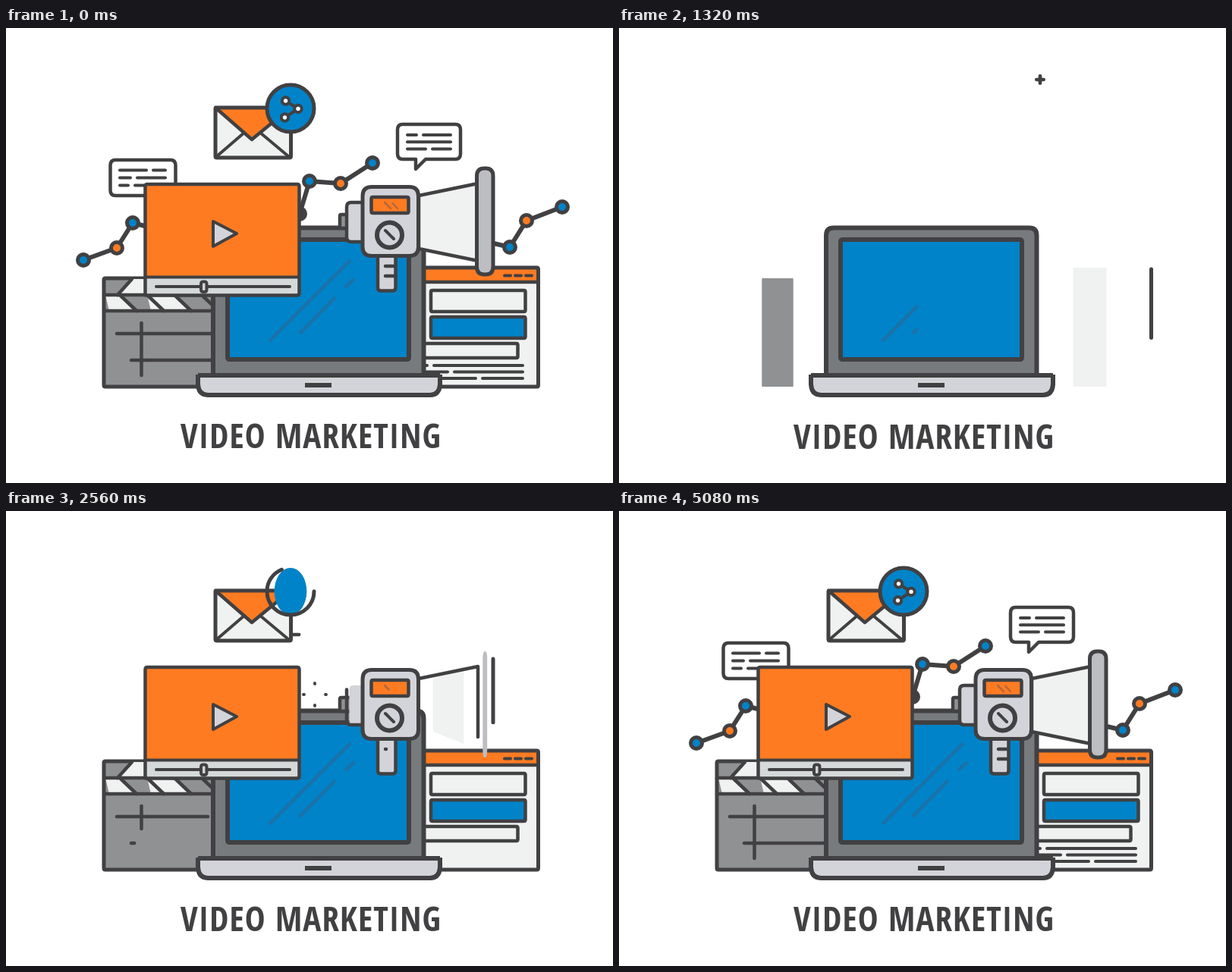
Write an HTML page that moves like this. It is 800 px wide and 600 px high and loops after 5120 ms.

```html
<!DOCTYPE html>
<html lang="en">
<head>
<meta charset="utf-8">
<title>Video Marketing</title>
<style>
  html, body { margin: 0; width: 100%; height: 100%; overflow: hidden; background: #fff; }
  svg { display: block; width: 100vw; height: 100vh; stroke-linecap: round; stroke-linejoin: round; }
  path { fill: none; }
  text { font-family: sans-serif; font-stretch: extra-condensed; fill: #414042; }
</style>
</head>
<body>
<svg viewBox="0 0 800 600">
  <clipPath id="below"><rect y="488" width="800" height="112"/></clipPath>
  <g id="art"></g>
  <g clip-path="url(#below)"><text id="title">VIDEO MARKETING</text></g>
</svg>
<script>
const LOOP = 5120, STEP = 40, DUR = 350;
const DARK = '#414042', ORANGE = '#ff7b22', BLUE = '#0083c8', GRAY = '#787b7e', SLATE = '#8f9193',
      LIGHT = '#d3d4d9', PALE = '#f0f1f1', RIM = '#bcbec2', SHINE = '#1a72a8', RUST = '#b5683c';
const updates = [];
let parent = document.getElementById('art');

// Parts start one after another on a shared clock.
let clock = 0, gap = 0;
function cue(start, stagger = 80) {
  clock = start;
  gap = stagger;
}
function next() {
  clock += gap;
  return clock - gap;
}

function ramp(t, start, dur = DUR) {
  const p = Math.min(1, Math.max(0, (t - start) / dur));
  return p * p * (3 - 2 * p);
}

function node(tag, attrs) {
  const el = document.createElementNS('http://www.w3.org/2000/svg', tag);
  for (const key in attrs) el.setAttribute(key, attrs[key]);
  parent.append(el);
  return el;
}

const show = (el, on) => el.setAttribute('visibility', on ? 'visible' : 'hidden');
const widen = (x, p) => `translate(${x * (1 - p)} 0) scale(${p || 0.001} 1)`;

function group(build, move, attrs) {
  const outer = parent;
  const g = parent = node('g', attrs);
  build();
  parent = outer;
  if (move) updates.push(t => g.setAttribute('transform', move(t)));
}

const slide = (dx, dy, start) => t => {
  const rest = 1 - ramp(t, start);
  return `translate(${dx * rest} ${dy * rest})`;
};

// Widens from its own vertical axis.
function fill(d, color, dur) {
  const start = next(), el = node('path', { d });
  el.style.fill = color;
  const box = el.getBBox(), axis = box.x + box.width / 2;
  updates.push(t => {
    const p = ramp(t, start, dur);
    show(el, p > 0.004);
    el.setAttribute('transform', widen(axis, p));
  });
}

// Trims a path: off and spin place the start, out is when it is wiped again.
function line(d, { w = 4.5, color = DARK, dur, off = 0, spin = 0, out = LOOP } = {}) {
  const start = next(), period = d.endsWith('Z') ? 1 : 2;
  const el = node('path', { d, pathLength: 1, stroke: color, 'stroke-width': w });
  updates.push(t => {
    const p = ramp(t, start, dur), q = ramp(t, out), len = p - q;
    show(el, len > 0.004);
    el.setAttribute('stroke-dasharray', len < 1 ? `${len} ${period - len}` : 'none');
    el.setAttribute('stroke-dashoffset', -(off + spin * p + q));
  });
  return el;
}

function shape(d, color, options = {}) {
  const start = clock;
  fill(d, color, options.dur);
  clock = start;
  return line(d, options);
}

const round = (x, y, w, h, r = 2) =>
  `M${x + w} ${y + r}v${h - 2 * r}q0 ${r} ${-r} ${r}h${2 * r - w}q${-r} 0 ${-r} ${-r}` +
  `v${2 * r - h}q0 ${-r} ${r} ${-r}h${w - 2 * r}q${r} 0 ${r} ${r}Z`;
const circle = (x, y, r) => `M${x + r} ${y}a${r} ${r} 0 1 1 ${-2 * r} 0a${r} ${r} 0 1 1 ${2 * r} 0Z`;

// Lines of copy, each broken by one word space (0 for none).
function copy(left, right, top, pitch, spaces) {
  spaces.forEach((x, i) => {
    const ends = x ? [[right, x + 4], [x - 5, left]] : [[right, left]];
    ends.forEach(([from, to]) => line(`M${from} ${top + i * pitch}H${to}`, { w: 4 }));
  });
}

function spark(x, y, start) {
  const el = node('path', { stroke: DARK });
  const turns = [0, 1, 2, 3].map(n => n * Math.PI / 2);
  updates.push(t => {
    const p = (t - start) / 500;
    show(el, p > 0 && p < 1);
    if (p <= 0 || p >= 1) return;
    const far = 15 * (1 - (1 - p) ** 6), near = Math.min(15 * p ** 0.8, far - 0.1);
    const at = (a, r) => `${x + r * Math.cos(a)} ${y + r * Math.sin(a)}`;
    el.setAttribute('d', turns.map(a => `M${at(a, near)}L${at(a, far)}`).join(''));
    el.setAttribute('stroke-width', 4.8 - p);
  });
}

// Speed lines that rush left and shrink against an edge.
function streaks(x, edge, y, start) {
  [0, 1, 2].forEach(i => {
    const el = node('path', { stroke: DARK, 'stroke-width': 4.5 });
    const from = x - 25 * i, reach = from - edge;
    updates.push(t => {
      const p = (t - start - 117 * i * i) / 700;
      show(el, p > 0 && p < 1);
      if (p <= 0 || p >= 1) return;
      const head = 1 - (1 - p) ** 6, tail = Math.min(p ** 0.6, head - 0.001);
      el.setAttribute('d', `M${from - reach * head} ${y + 21 * i}H${from - reach * tail}`);
    });
  });
}

function floorLine() {
  cue(40, 0);
  line('M405 484H54', { w: 5, dur: 460, out: 760 });
  line('M405 484H756', { w: 5, dur: 460, out: 640 });
}

// Starts at a dark joint; the other joints alternate blue and orange.
function chain(...points) {
  cue(2780);
  line('M' + points.join('L'), { w: 6, dur: 470 });
  cue(2780, 110);
  points.forEach(([x, y], i) =>
    shape(circle(x, y, 7.5), i ? (i % 2 ? BLUE : ORANGE) : DARK, { w: 5, dur: 200 }));
}

function charts() {
  chain([210, 268], [167, 257], [146, 290], [102, 306]);
  chain([387, 245], [400, 202], [441, 205], [483, 178]);
  chain([630, 281], [664, 289], [686, 254], [733, 236]);
}

function leftBubble() {
  cue(2580);
  line(round(137.5, 174, 86, 47, 7));
  cue(2740, 70);
  copy(150, 210, 187.5, 10, [190, 169, 166]);
}

function rightBubble() {
  cue(2860);
  group(() => line('M516 143v-9q0 -7 7 -7h69q7 0 7 7v32q0 7 -7 7h-39l-13 13v-13h-17q-7 0 -7 -7Z',
    { dur: 430 }), slide(35, 0, 2880));
  cue(3240, 60);
  copy(529, 586, 141, 9.3, [546, 0, 558]);
}

function clapper() {
  const slots = [0, 1, 2, 3], edge = 131, pitch = 36;
  cue(1180);
  shape(round(129, 330, 160, 143), SLATE, { w: 5, dur: 420 });
  cue(1640, 60);
  slots.forEach(i => {
    const top = 147 + pitch * i, low = Math.max(edge, 114 + pitch * i);
    if (i % 2 == 0) {
      fill(`M${top} 352l19 -21h${pitch}l-19 21Z`, PALE);
      fill(`M${low} 352H${150 + pitch * i}l22 21H${low + 5}Z`, PALE);
    }
  });
  cue(1480, 60);
  slots.reverse().forEach(i => line(`M${147 + pitch * i} 352l19 -21`));
  slots.forEach(i => line(`M${150 + pitch * i} 352l22 21`));
  cue(1430, 130);
  [352, 373].forEach(y => line(`M129 ${y}H280`));
  cue(2280, 120);
  ['M146 403H280', 'M178.5 389V458', 'M165 438H280'].forEach(d => line(d));
}

function browser() {
  cue(1200, 120);
  fill('M540 316H701V473H540Z', PALE);
  fill('M540 316H701V335H540Z', ORANGE);
  cue(1220, 240);
  line(round(540, 316, 161.5, 157), { w: 5, dur: 420 });
  line('M540 335H701');
  cue(1660, 90);
  [0, 1, 2].forEach(i => line(`M${657 + 14 * i} 326.5h8`, { w: 4 }));
  [PALE, BLUE, PALE].forEach((color, i) => {
    const start = 1750 + 200 * i, box = round(560 - 10 * (i >> 1), 346 + 35 * i, 124.5, 28 - 9 * (i >> 1));
    group(() => {
      cue(start + 280);
      fill(box, color);
      cue(start);
      line(box, { dur: 100 });
    }, t => widen(560, ramp(t, start)));
  });
  cue(2600, 100);
  copy(553, 681, 445, 8.5, [560, 587, 624]);
}

function laptop() {
  cue(560, 110);
  const lid = round(273, 263.5, 277.5, 204.5, 10);
  fill(lid, GRAY);
  line(lid, { w: 6, off: 0.356 });

  const size = t => ramp(t, 800) || 0.001;
  group(() => {
    const screen = round(292, 279, 239, 158, 3);
    cue(960);
    fill(screen, BLUE);
    cue(800);
    const frame = line(screen, { w: 6, dur: 190, off: 0.27 });
    updates.push(t => frame.setAttribute('stroke-width', 6 / size(t)));
    cue(1160);
    ['M347 413L454 306', 'M387 403L434 355', 'M447 342L459 331'].forEach(d => line(d, { color: SHINE }));
  }, t => `translate(412 358) scale(${size(t)}) translate(-412 -358)`);

  const tray = 'M253 457v13q1 14 13 14h293q12 0 13 -14v-13';
  cue(740);
  shape(tray, LIGHT, { w: 6 });
  cue(620);
  line('M572 458H253', { w: 6 });
  cue(880);
  line('M394 471H429', { w: 6 });
}

function envelope() {
  const flap = 'M276 105L324 147L375 105';
  group(() => {
    cue(1975);
    fill('M276 105H375V171H276Z', PALE);
    cue(1860, 20);
    fill(flap + 'Z', ORANGE);
    ['M278 169L314 138', 'M335 138L372 169'].forEach(d => line(d, { w: 4, dur: 250 }));
    cue(1760);
    line(flap);
    cue(1460);
    line(round(276, 105, 99.5, 66), { w: 5, dur: 820, off: -0.055, spin: 0.37 });
  }, slide(90, 0, 1560));

  const dots = [[368.5, 96], [385, 106.5], [367.5, 118]];
  cue(2340, 220);
  shape(circle(375, 106, 31), BLUE, { w: 5 });
  line('M' + dots.join('L'), { w: 4 });
  cue(2560);
  dots.forEach(([x, y]) => shape(circle(x, y, 4.7), '#fff', { w: 4 }));
}

function player() {
  group(() => {
    cue(1590, 155);
    fill('M183 206H386V329H183Z', ORANGE);
    fill('M183 329H386V353H183Z', '#d5d9d9');
    line('M184 328.5H386', { w: 4 });
    cue(1440);
    line(round(183.5, 206, 203, 146.5, 3), { dur: 1000, off: 0.06, spin: 0.42 });
    cue(1870, 160);
    shape('M273 288V255L304 271Z', LIGHT, { w: 4 });
    line('M198 341H374', { w: 4, off: 0.33, spin: -0.33 });
    shape(round(257, 334.5, 7.5, 13.5, 3), LIGHT, { w: 4 });
  }, slide(90, 54, 1585));
}

function megaphone() {
  cue(2200, 60);
  shape(round(490, 295, 23.5, 51.5, 4), LIGHT);
  shape(round(440, 246, 15, 18), SLATE);
  shape(round(449, 230, 29, 52, 6), LIGHT);
  shape('M544 221L622 205V307L544 291Z', PALE);
  shape(round(620.5, 185, 21.5, 140, 10), RIM, { w: 5 });
  [314, 327].forEach(y => line(`M500 ${y}h13`));
  group(() => {
    const display = round(481.5, 223, 49, 21);
    cue(1500);
    shape(round(470, 209.5, 73.5, 91, 12), LIGHT, { w: 5, off: 0.17 });
    cue(2090);
    fill(display, ORANGE);
    cue(1945);
    line(display);
    cue(1800, 270);
    line(circle(505.5, 273, 16.5), { w: 6 });
    line('M511 278L500 267', { w: 4 });
    ['M499 230l8 8', 'M509.5 231l6.5 7'].forEach(d => line(d, { w: 2.5, color: RUST }));
  }, slide(2, -3, 1700));
}

function accents() {
  streaks(470, 376, 121, 1640);
  streaks(690, 602, 114, 2985);
  [[47, 271, 780], [555, 68, 1290], [235, 146, 1480], [482, 121, 1640],
   [772, 289, 1610], [407, 242, 2100]].forEach(s => spark(...s));
}

// Sets the title in the narrowest face at hand and tracks it out to the column.
function caption() {
  const title = document.getElementById('title'), column = 343;
  const setFace = name => { title.style.fontFamily = `"${name}", sans-serif`; };
  const measure = name => {
    setFace(name);
    return title.getComputedTextLength();
  };
  title.style.fontSize = '48px';
  const [natural, face] = ['Open Sans Condensed', 'Roboto Condensed', 'Open Sans', 'Roboto', 'Lato',
    'Noto Sans CJK JP', 'Noto Sans'].map(name => [measure(name), name]).sort((a, b) => a[0] - b[0])[0];
  setFace(face);
  const size = 48 * Math.min(1, 328 / natural);
  title.style.fontSize = size + 'px';
  title.style.letterSpacing = (column - title.getComputedTextLength()) / 14 + 'px';
  title.setAttribute('x', 230);
  title.setAttribute('y', 538 + size * 0.355);
  updates.push(t => {
    const drop = 72 * ramp(t, 580, 260) - 70 - 2 * ramp(t, 900, 800);
    title.setAttribute('transform', `translate(0 ${drop})`);
  });
}

[floorLine, charts, leftBubble, clapper, browser].forEach(draw => draw());
group(laptop, null, { 'stroke-linecap': 'butt' });
[envelope, player, megaphone, rightBubble, accents, caption].forEach(draw => draw());

const origin = performance.now();
function render(now) {
  const step = Math.floor(Math.max(0, now - origin) % LOOP / STEP) * STEP;
  // The loop opens on the finished scene, then cuts to blank.
  updates.forEach(update => update(step || LOOP - STEP));
  requestAnimationFrame(render);
}
render(origin);
</script>
</body>
</html>
```
